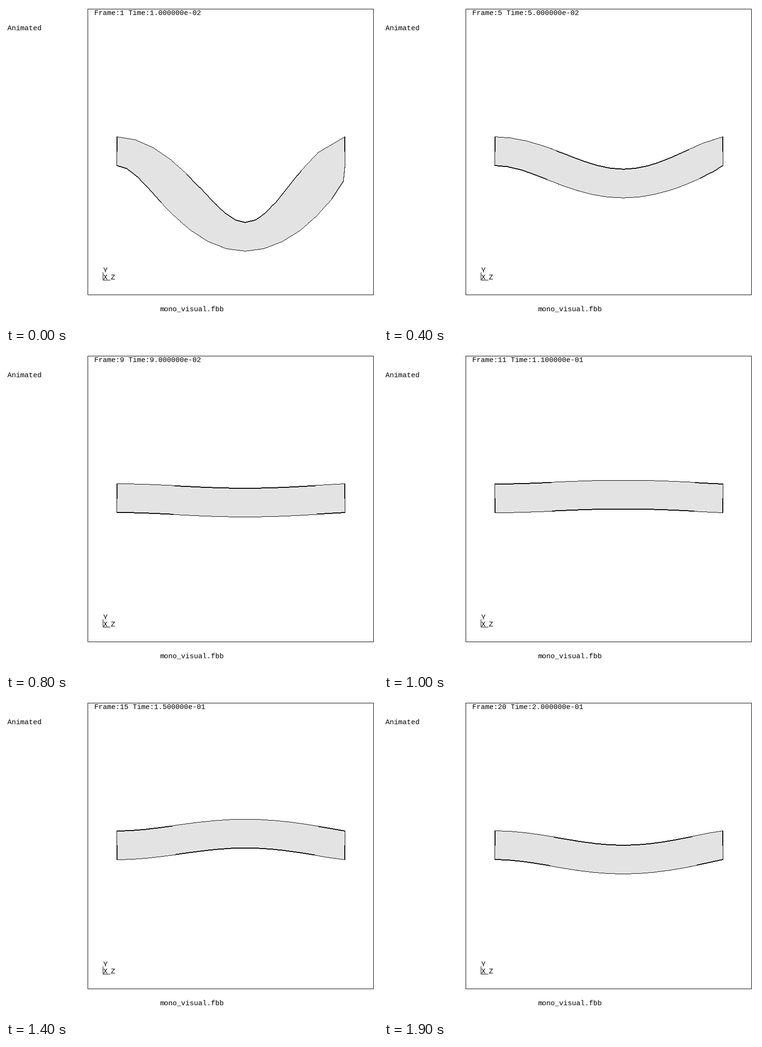
A matplotlib script that plays this animation: 784x672 px, repeating every 2 s.

```python
import numpy as np
import matplotlib.pyplot as plt
from matplotlib.animation import FuncAnimation

W, H, DPI = 784, 672, 100
FRAMES, INTERVAL = 20, 100
FLIP = 19
WHITE, GREY, BLACK = 255, 228, 0
LEFT, RIGHT, TOP, BOTTOM = 233, 714, 275, 336

plt.rcParams.update({"text.hinting": "native", "text.hinting_factor": 1,
                     "toolbar": "None"})

fig = plt.figure(figsize=(W / DPI, H / DPI), dpi=DPI, facecolor="white")
ax = fig.add_axes([0, 0, 1, 1])
ax.axis("off")


def trace(canvas, points):
    """Draw a one-pixel polyline without smoothing."""
    points = np.asarray(points, float)
    for p, q in zip(points, points[1:]):
        count = int(np.ceil(abs(q - p).max())) + 1
        x, y = np.rint(np.linspace(p, q, count)).astype(int).T
        canvas[y, x] = BLACK


def label(x, y, text):
    return ax.text(x, y, text, family="Liberation Mono",
                   fontsize=15 * 72 / DPI, color="black",
                   ha="left", va="baseline")


def mode_shape(nodes=16, peak=9):
    """Sideways and downward motion of a beam fixed left, hinged right."""
    k = np.arange(nodes + 1)
    left = k <= peak
    q = np.where(left, k / peak, (nodes - k) / (nodes - peak))
    sag = np.sin(np.pi / 2 * q) ** np.where(left, 1.9, 1.12)
    shear = np.where(left, 0.15 * np.sin(np.pi * q),
                     -0.178 * np.sin(np.pi * q ** 0.6))
    return shear, sag


def deflection(n):
    a = 210.5 * (1 - (n - 1) / 26) ** 4.56 - 30.5
    return -a if n >= FLIP else a


SHEAR, SAG = mode_shape()
NODES = np.linspace(LEFT, RIGHT, len(SAG))
COLS = np.arange(LEFT, RIGHT + 1)
ROWS = np.arange(H)[:, None]

backdrop = np.full((H, W), WHITE, np.uint8)
trace(backdrop, [(172, 6), (774, 6), (774, 608), (172, 608), (172, 6)])
trace(backdrop, [(204, 561), (204, 577), (219, 577)])

picture = ax.imshow(backdrop, cmap="gray", vmin=0, vmax=255,
                    extent=(0, W, H, 0), aspect="auto",
                    interpolation="nearest")
for x, y, text in [(3, 51, "Animated"), (324, 642, "mono_visual.fbb"),
                   (205, 561, "Y"), (205, 576, "X"), (220, 576, "Z")]:
    label(x, y, text)
title = label(186, 19, "")


def draw(i):
    n = i + 1
    a = deflection(n)
    title.set_text(f"Frame:{n} Time:{n / 100:.6e}")

    top = np.column_stack([NODES + SHEAR * a, TOP + SAG * a])
    bottom = np.column_stack([NODES - SHEAR * a, BOTTOM + SAG * a])
    canvas = backdrop.copy()
    inside = ((ROWS >= np.interp(COLS, *top.T))
              & (ROWS <= np.interp(COLS, *bottom.T)))
    canvas[:, LEFT:RIGHT + 1][inside] = GREY
    trace(canvas, np.vstack([top, bottom[::-1], top[:1]]))

    # Parts of the edge are doubled, on the side the beam bends towards
    if a > 0:
        inner, outer, end, step = top, bottom, TOP, (0, 1)
    else:
        inner, outer, end, step = bottom, top, BOTTOM, (0, -1)
    trace(canvas, inner[4:15] + step)
    trace(canvas, outer[:5] - step)
    trace(canvas, outer[14:] - step)
    for x in (LEFT + 1, RIGHT - 1):
        trace(canvas, [(x, end), (x, (TOP + BOTTOM) / 2)])

    picture.set_data(canvas)
    return picture, title


anim = FuncAnimation(fig, draw, frames=FRAMES, interval=INTERVAL,
                     init_func=lambda: draw(0), repeat=True, repeat_delay=0)
plt.show()
```
